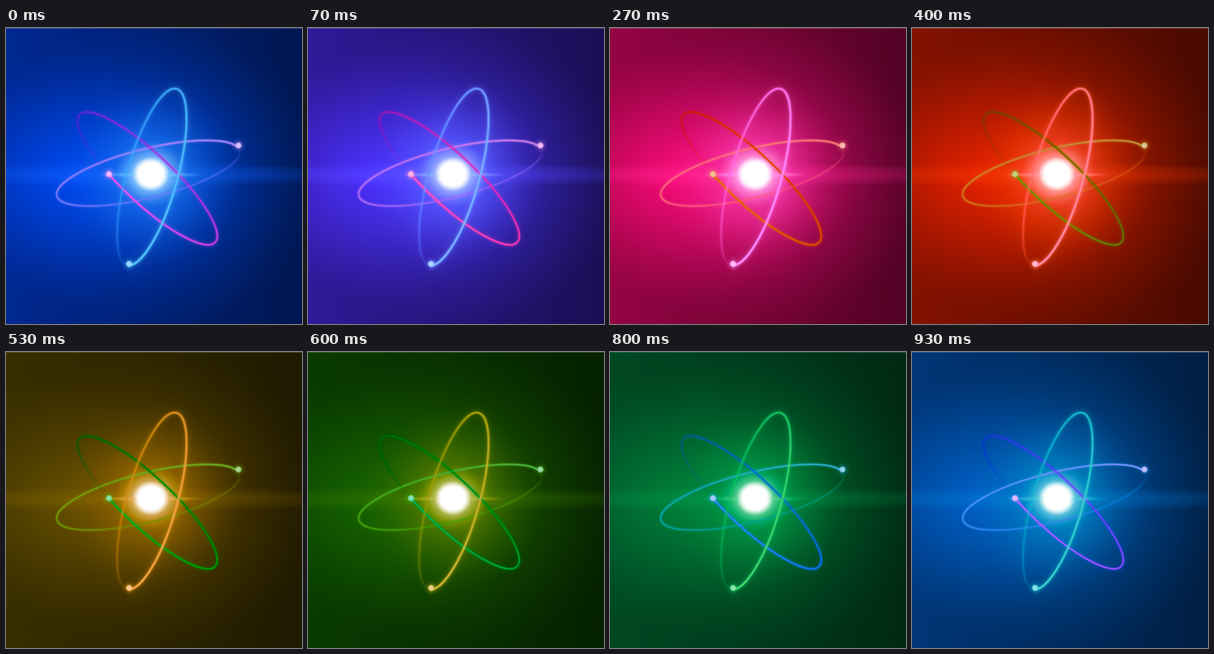
Animation, 480 px wide and 480 px high, one loop 990 ms. Source, as an HTML page with a canvas:

```html
<!DOCTYPE html>
<html lang="en">
<head>
<meta charset="utf-8">
<title>Atom</title>
<style>
  html, body { margin: 0; width: 100%; height: 100%; overflow: hidden; background: #000; }
  canvas { display: block; width: 480px; height: 480px; }
</style>
</head>
<body>
<canvas id="stage" width="480" height="480"></canvas>
<script>
const stage = document.getElementById('stage');
const ctx = stage.getContext('2d');
const TAU = Math.PI * 2;
const rad = deg => deg * Math.PI / 180;
const rgba = (c, a) => `rgba(${c.map(Math.round).join()},${Math.min(1, a)})`;
const mix = (c, d, k) => c.map((v, i) => v + (d[i] - v) * k);

// Soft elliptical light whose alpha falls as (1 - r)^power
function glow(x, y, rx, ry, colour, alpha, power) {
  const g = ctx.createRadialGradient(0, 0, 0, 0, 0, 1);
  for (let r = 0; r <= 1; r += 1 / 32) {
    g.addColorStop(r, rgba(colour, alpha * (1 - r) ** power));
  }
  ctx.save();
  ctx.translate(x, y);
  ctx.scale(rx, ry);
  ctx.fillStyle = g;
  ctx.beginPath();
  ctx.arc(0, 0, 1, 0, TAU);
  ctx.fill();
  ctx.restore();
}

// Paint that runs backwards round the ellipse from the head and fades out
function trail({ a, b, head, from, to }, alpha) {
  const polar = p => Math.atan2(b * Math.sin(p), a * Math.cos(p));
  const start = polar(rad(head)), n = 60;
  const g = ctx.createConicGradient(start, 0, 0);
  for (let k = 0; k <= n; k++) {
    const q = k / n;
    const turn = ((polar(rad(head) - TAU * q) - start) / TAU + 2) % 1;
    const at = k === 0 ? 1 : k === n ? 0 : turn;
    g.addColorStop(at, rgba(mix(from, to, q), alpha * (1 - q ** 3)));
  }
  return g;
}

function orbit(o) {
  ctx.save();
  ctx.translate(o.x, o.y);
  ctx.rotate(rad(o.tilt));
  ctx.beginPath();
  ctx.ellipse(0, 0, o.a, o.b, 0, 0, TAU);
  for (let i = o.halo; i >= 0; i--) {
    ctx.lineWidth = o.width * 1.8 ** i;
    ctx.strokeStyle = trail(o, 0.9 * 0.37 ** i);
    ctx.stroke();
  }
  ctx.restore();
}

function electron(x, y, colour) {
  glow(x, y, 13, 13, colour, 0.6, 1.5);
  glow(x, y, 6, 6, mix(colour, [255, 255, 255], 0.4), 2.2, 1);
}

// Backdrop
const base = ctx.createLinearGradient(0, 0, 480, 0);
base.addColorStop(0, 'rgb(0,40,145)');
base.addColorStop(1, 'rgb(0,22,80)');
ctx.fillStyle = base;
ctx.fillRect(0, 0, 480, 480);
glow(110, 240, 300, 210, [0, 72, 255], 0.85, 1.5);
glow(235, 238, 290, 260, [0, 85, 255], 0.8, 1.4);
glow(200, 238, 420, 20, [20, 100, 255], 0.55, 1);

// Nucleus and its flare
glow(235, 237, 150, 155, [50, 160, 255], 0.75, 1.8);
glow(235, 237, 62, 56, [200, 238, 255], 1.5, 1.6);
glow(235, 238, 85, 5, [110, 195, 255], 1.2, 1);

orbit({ x: 230.5, y: 235.5, a: 152.5, b: 39.8, tilt: -13.9, head: -12,
  width: 2.4, halo: 2, from: [175, 135, 255], to: [80, 110, 255] });
orbit({ x: 229.3, y: 244, a: 151, b: 40.2, tilt: 43.3, head: 110,
  width: 2.4, halo: 3, from: [250, 80, 245], to: [120, 10, 220] });
orbit({ x: 236.5, y: 241.5, a: 148.4, b: 41, tilt: -74.3, head: 177,
  width: 2.9, halo: 5, from: [90, 205, 255], to: [40, 150, 255] });

glow(235, 237, 30, 28, [255, 255, 255], 3, 1);

electron(377, 190.5, [190, 140, 255]);
electron(167, 237, [248, 130, 245]);
electron(199.5, 382.5, [80, 195, 255]);

// Pale rim along the top edge
ctx.fillStyle = 'rgba(150,155,175,0.45)';
ctx.fillRect(0, 0, 480, 1);

// Hard hue steps, each starting on a whole 10 ms tick
const loop = 990, steps = 15;
stage.animate(Array.from({ length: steps }, (_, i) => ({
  offset: Math.max(0, Math.round(i * 20 / 3) * 10 - 0.1) / loop,
  filter: `hue-rotate(${i * 360 / steps}deg)`,
  easing: 'step-end'
})), { duration: loop, iterations: Infinity });
</script>
</body>
</html>
```
